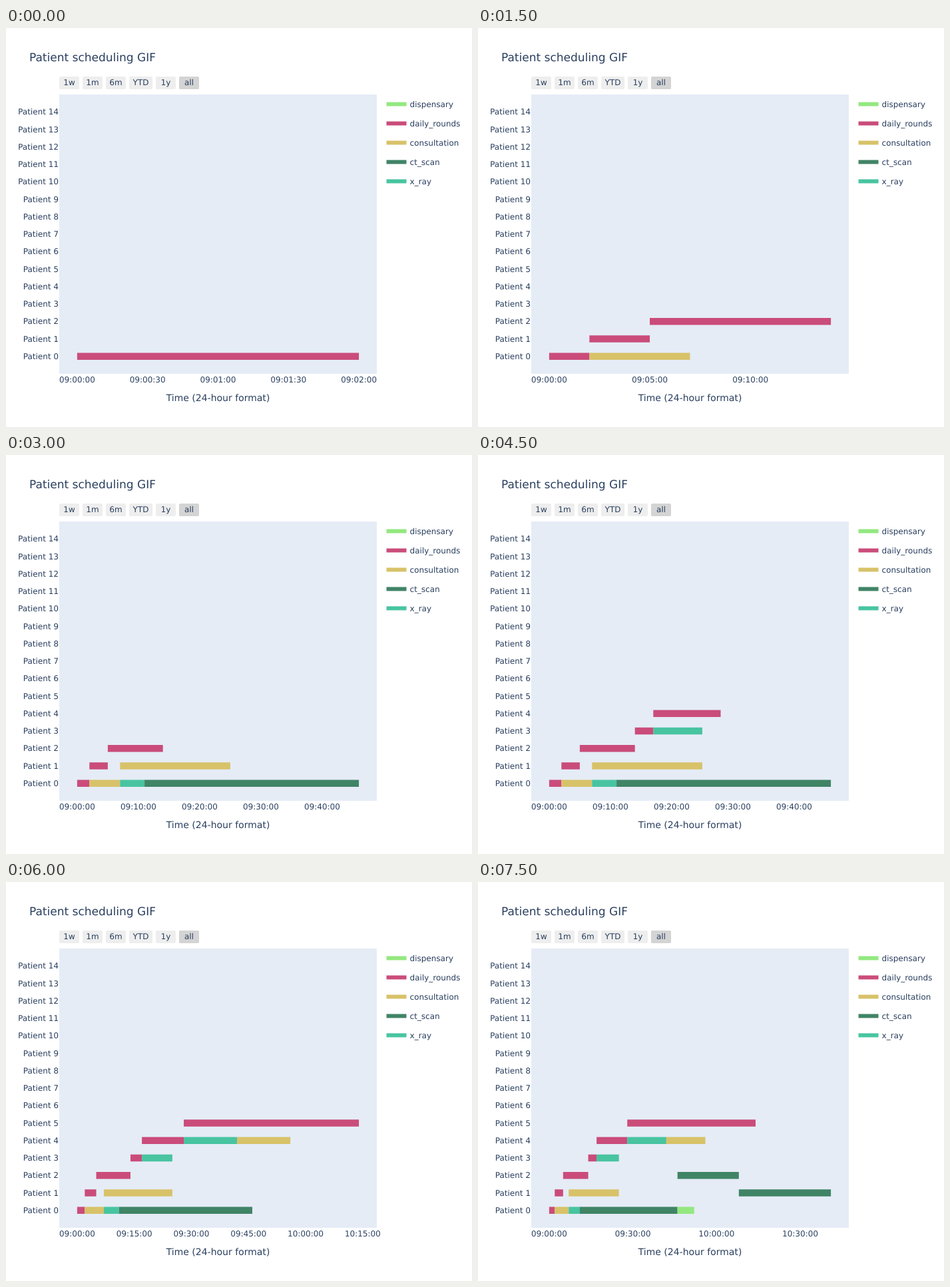
These frames come from a looping animation (700x600 px, 8 s). A matplotlib script:

```python
import matplotlib.pyplot as plt
from matplotlib.animation import FuncAnimation
from matplotlib.patches import FancyBboxPatch, PathPatch, Rectangle
from matplotlib.textpath import TextPath
from matplotlib.transforms import Affine2D

W, H, DPI = 700, 600, 100
STEP_MS = 500
INK = "#2a3f5f"
FONT = {"family": "DejaVu Sans"}

# Plot area in pixels
LEFT, TOP, PLOT_W, PLOT_H = 80, 100, 477, 420
PATIENTS = 15
ROW = PLOT_H / (PATIENTS + 1)
PAD = 26.9
SPAN = PLOT_W - 2 * PAD

COLORS = {
    "dispensary": "#93e87f",
    "daily_rounds": "#ca4c7a",
    "consultation": "#d8c269",
    "ct_scan": "#408466",
    "x_ray": "#48c4a1",
}

# (patient, task, start minute, end minute), one added per step
EVENTS = [
    (0, "daily_rounds", 0, 2),
    (1, "daily_rounds", 2, 5),
    (0, "consultation", 2, 7),
    (2, "daily_rounds", 5, 14),
    (1, "consultation", 7, 25),
    (0, "x_ray", 7, 11),
    (0, "ct_scan", 11, 46),
    (3, "daily_rounds", 14, 17),
    (4, "daily_rounds", 17, 28),
    (3, "x_ray", 17, 25),
    (5, "daily_rounds", 28, 74),
    (4, "x_ray", 28, 42),
    (4, "consultation", 42, 56),
    (2, "ct_scan", 46, 68),
    (0, "dispensary", 46, 52),
    (1, "ct_scan", 68, 101),
]

fig = plt.figure(figsize=(W / DPI, H / DPI), dpi=DPI, facecolor="white")
ax = fig.add_axes([0, 0, 1, 1])
ax.set_xlim(0, W)
ax.set_ylim(H, 0)
ax.axis("off")


def text_width(s, size):
    """Advance width, measured against a trailing bar."""
    def right(t):
        return TextPath((0, 0), t, size=size, prop=FONT).get_extents().x1
    return right(s + "|") - right("|")


def label(x, baseline, s, size=12, align=0.0):
    """Text with align 0 = left, 0.5 = centre, 1 = right."""
    path = TextPath((0, 0), s, size=size, prop=FONT)
    place = Affine2D().scale(1, -1).translate(
        x - align * text_width(s, size), baseline)
    return ax.add_patch(PathPatch(place.transform_path(path), fc=INK, lw=0))


def box(x, y, w, h, color):
    return ax.add_patch(Rectangle((x, y), w, h, fc=color, lw=0, snap=False))


def row_y(patient):
    return TOP + PLOT_H - (patient + 1) * ROW


def draw_static():
    label(35, 50, "Patient scheduling GIF", 17)
    box(LEFT, TOP, PLOT_W, PLOT_H, "#e5ecf6")

    x = LEFT
    for name in ("1w", "1m", "6m", "YTD", "1y", "all"):
        w = 35 if name == "YTD" else 30
        ax.add_patch(FancyBboxPatch(
            (x, 73), w, 19, boxstyle="round,pad=0,rounding_size=2",
            fc="#d4d4d4" if name == "all" else "#eeeeee", lw=0))
        label(x + w / 2, 86, name, align=0.5)
        x += w + 5

    for p in range(PATIENTS):
        label(LEFT - 1, int(row_y(p) + 4.7), f"Patient {p}", align=1)

    for i, (task, color) in enumerate(COLORS.items()):
        y = 114.5 + 29 * i
        box(571.54, y - 3, 30, 6, color)
        label(606.54, int(y + 4.7), task)

    label(LEFT + PLOT_W / 2, 561, "Time (24-hour format)", 14, align=0.5)


def tick_step(minutes):
    rough = minutes / (PLOT_W / 80 + 1)
    return next(s for s in (0.5, 1, 2, 5, 10, 15, 30, 60) if s >= rough)


def clock(minutes):
    sec = 9 * 3600 + round(minutes * 60)
    return f"{sec // 3600:02d}:{sec // 60 % 60:02d}:{sec % 60:02d}"


live = []


def update(frame):
    while live:
        live.pop().remove()

    shown = EVENTS[:frame + 1]
    scale = SPAN / max(end for *_, end in shown)

    for patient, task, start, end in shown:
        live.append(box(LEFT + PAD + start * scale, row_y(patient) - 0.2 * ROW,
                        (end - start) * scale, 0.4 * ROW, COLORS[task]))

    step = tick_step(PLOT_W / scale)
    t = 0
    while PAD + t * scale <= PLOT_W:
        live.append(label(LEFT + PAD + t * scale, 533, clock(t), align=0.5))
        t += step
    return live


draw_static()
anim = FuncAnimation(fig, update, frames=len(EVENTS), init_func=lambda: [],
                     interval=STEP_MS, repeat=True, repeat_delay=0, blit=False)
plt.show()
```
